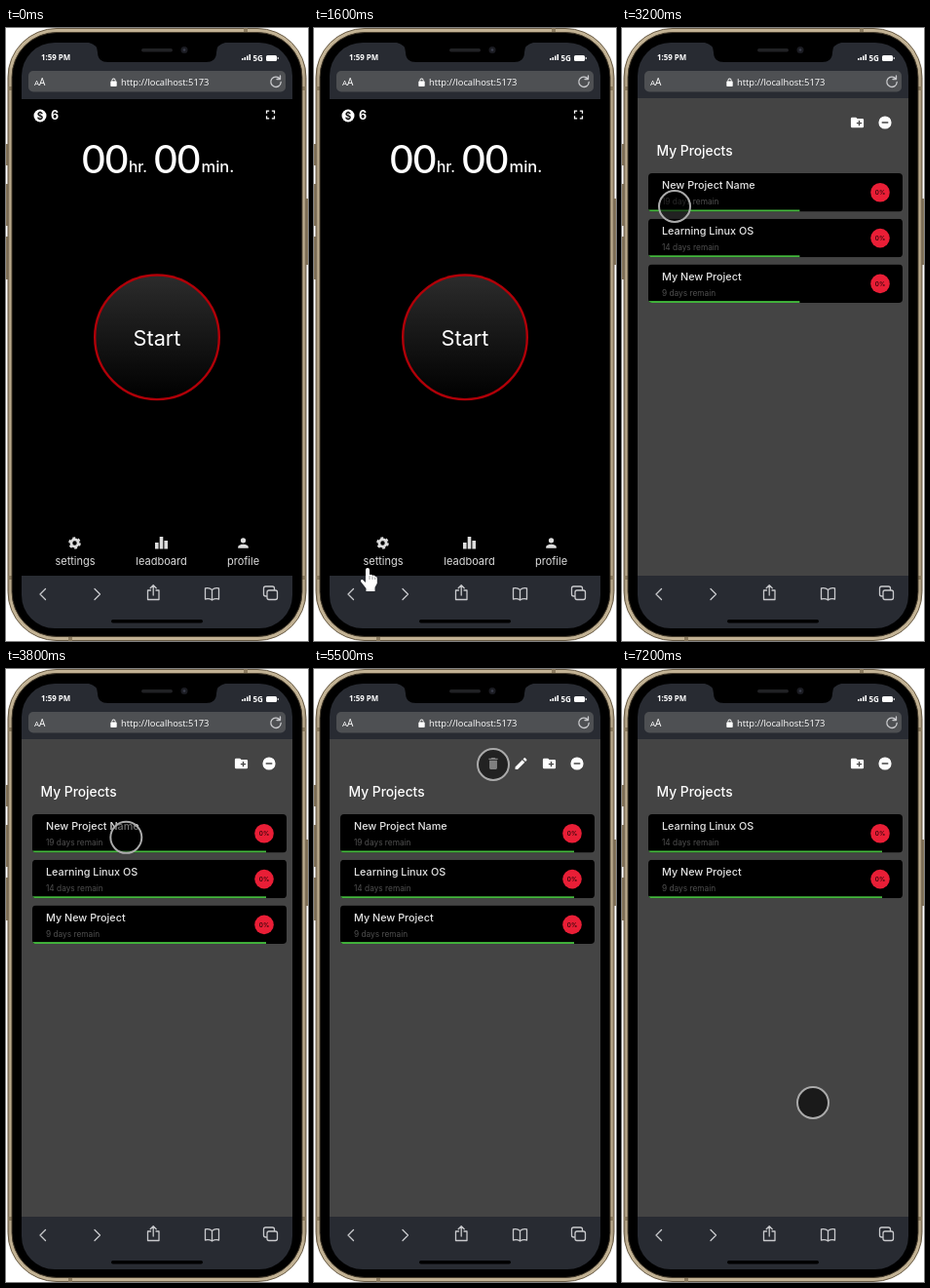
An HTML page that plays this animation: 310 px wide and 629 px high, repeating every 8 s.

```html
<!DOCTYPE html>
<html lang="en">
<head>
<meta charset="utf-8">
<title>Project timer</title>
<style>
  html, body { margin: 0; width: 100%; height: 100%; overflow: hidden; background: #fff; }
  svg { display: block; width: 310px; height: 629px; font-family: Inter, sans-serif; fill: #fff; }
  .system { font-family: "Open Sans", sans-serif; }
  .digits { font: 500 41px Lato, sans-serif; }
  .unit { font-weight: 500; }
  .line { fill: none; stroke: #c9cacd; stroke-width: 1.3; stroke-linecap: round; stroke-linejoin: round; }
  .tabs { fill: #ddd; font-size: 11px; text-anchor: middle; }
</style>
</head>
<body>
<svg viewBox="0 0 310 629">
  <defs>
    <linearGradient id="gold">
      <stop stop-color="#8f7f65"/><stop offset=".01" stop-color="#c2b294"/>
      <stop offset=".99" stop-color="#c2b294"/><stop offset="1" stop-color="#8f7f65"/>
    </linearGradient>
    <linearGradient id="dome" x2="0" y2="1">
      <stop stop-color="#2c2c2c"/><stop offset="1" stop-color="#000"/>
    </linearGradient>
    <clipPath id="glass"><rect x="16" y="15" width="278" height="601" rx="34"/></clipPath>
    <clipPath id="cardShape"><rect width="261" height="39.5" rx="4"/></clipPath>
  </defs>

  <!-- phone body -->
  <path fill="#8a7a5f" d="M0 119h4v22H0zM0 160h4v43H0zM0 214h4v44H0zM306 175h4v68h-4z"/>
  <rect x="2" y=".5" width="306" height="628" rx="50" fill="url(#gold)" stroke="#6a5d48"/>
  <path fill="#8c7c60" d="M2 60h5v4H2zM303 60h5v4h-5zM2 562h5v4H2zM303 562h5v4h-5zM244 0h4v5h-4zM64 624h4v5h-4z"/>
  <rect x="6" y="4.5" width="298" height="620" rx="46" fill="#000" stroke="#4a4030"/>

  <g clip-path="url(#glass)">
    <rect x="16" y="15" width="278" height="601" fill="#282b32"/>

    <g id="home">
      <rect x="16" y="73" width="278" height="489" fill="#000"/>
      <circle cx="35" cy="90" r="6.5"/>
      <text x="35" y="93.7" font-size="10" font-weight="600" text-anchor="middle" fill="#000">$</text>
      <text x="46" y="94" font-size="12.5" font-weight="700">6</text>
      <g data-icon="expand" data-at="271.5 89"></g>
      <text class="digits" x="78" y="148.5">00</text>
      <text class="unit" x="126" y="148" font-size="15.5">hr.</text>
      <text class="digits" x="152" y="148.5">00</text>
      <text class="unit" x="200.5" y="148" font-size="16.5">min.</text>
      <circle cx="155" cy="317.3" r="63.8" fill="url(#dome)" stroke="#b00008" stroke-width="2.4"/>
      <text x="155" y="325.7" font-size="21.7" text-anchor="middle">Start</text>
      <g fill="none" stroke="#ddd">
        <circle cx="70.5" cy="528.5" r="3.6" stroke-width="2.8"/>
        <circle cx="70.5" cy="528.5" r="5.3" stroke-width="2" stroke-dasharray="2.8 2.75"/>
      </g>
      <path fill="#ddd" d="M153 528h3.6v6.5h-3.6zM157.7 522h3.6v12.5h-3.6zM162.4 526h3.6v8.5h-3.6z"/>
      <g data-icon="person" data-at="243.5 528.5" fill="#ddd"></g>
      <g class="tabs">
        <text x="71" y="551">settings</text>
        <text x="159.5" y="551">leadboard</text>
        <text x="243.5" y="551">profile</text>
      </g>
    </g>

    <g id="projects">
      <rect x="16" y="72" width="278" height="490" fill="#444"/>
      <g id="tools">
        <g data-icon="trash" data-at="184 97"></g>
        <g data-icon="pencil" data-at="212.5 97"></g>
      </g>
      <g data-icon="folder" data-at="241.5 97"></g>
      <g data-icon="minus" data-at="270 97"></g>
      <text x="35.5" y="131" font-size="13.8" font-weight="500">My Projects</text>
      <g id="cards"></g>
    </g>

    <!-- browser chrome -->
    <path fill="#000" d="M85 15h140q-9 2-9 10 0 10-11 10H105q-11 0-11-10 0-8-9-10z"/>
    <rect x="139" y="21" width="32" height="3.5" rx="1.7" fill="#202124"/>
    <circle cx="183" cy="22.5" r="3.5" fill="#1b1c22"/>
    <circle cx="183" cy="22.5" r="1.3" fill="#3a3d4a"/>
    <g class="system">
      <text x="36" y="33" font-size="7.9" font-weight="700">1:59 PM</text>
      <path d="M242 31h1.5v2H242zM244.5 30h1.5v3h-1.5zM247 28.5h1.5V33H247zM249.5 27h1.5v6h-1.5z"/>
      <text x="253.5" y="33.5" font-size="8" font-weight="700">5G</text>
      <rect x="267" y="28" width="11" height="6" rx="1.5"/>
      <path d="M278.7 30h1v2h-1z"/>
      <rect x="23" y="44" width="264" height="21.5" rx="5" fill="#4e5053"/>
      <text x="29" y="59" font-size="8">A</text>
      <text x="34" y="59" font-size="10">A</text>
      <g data-icon="lock" data-at="110.5 56" data-scale=".4"></g>
      <text x="118" y="59" font-size="9.35">http://localhost:5173</text>
    </g>
    <g class="line">
      <path d="M281.2 52.2a5.2 5.2 0 1 0 1 3.300M278 52.500h3.500V49"/>
      <path d="M40.500 575.500l-5.500 5.500 5.500 5.500M91 575.500l5.500 5.500-5.500 5.500"/>
      <path d="M148.500 577H145.500v9.500h11.500V577h-3M151.200 582v-10M148.200 574.700l3-3 3 3"/>
      <path d="M211.500 576.500q-3-2.500-7-1.500v11q4-1 7 1 3-2 7-1v-11q-4-1-7 1.500zv10.500"/>
      <rect x="268" y="577" width="10.500" height="9.500" rx="2"/>
      <path d="M267.500 583h-1a2 2 0 0 1-2-2v-6a2 2 0 0 1 2-2h7a2 2 0 0 1 2 2v1.500"/>
    </g>
    <rect x="108" y="607" width="94" height="3.600" rx="1.800" fill="#000"/>
  </g>

  <g id="hand">
    <path d="M-2 2a2 2 0 0 1 4 0v5q2-1 3 .8 2-.8 2.800 1 2-.2 2 2v5L7.500 20v4h-9v-3L-7 14q-.5-2.500 1.800-2l3.200 3z"/>
    <path d="M2 8v4M5 8.500V12M7.700 9.500V12" fill="none" stroke="#777" stroke-width=".7"/>
  </g>
  <circle id="touch" r="16" stroke="#aaa" stroke-width="2"/>
</svg>

<script>
const LOOP = 8000, OPEN_LIST = 1900, SHOW_TOOLS = 4400, DELETE = 7200;
const CARD_STEP = 46.8;
const $ = id => document.getElementById(id);

const icons = {
  expand: 'M7 14H5v5h5v-2H7zM5 10h2V7h3V5H5zM17 17h-3v2h5v-5h-2zM14 5v2h3v3h2V5z',
  person: 'M12 12a4 4 0 1 0 0-8 4 4 0 0 0 0 8zm0 2c-2.7 0-8 1.3-8 4v2h16v-2c0-2.7-5.3-4-8-4z',
  trash: 'M6 19a2 2 0 0 0 2 2h8a2 2 0 0 0 2-2V7H6zM19 4h-3.5l-1-1h-5l-1 1H5v2h14z',
  pencil: 'M3 17.25V21h3.75L17.8 9.94l-3.75-3.75zM20.7 7a1 1 0 0 0 0-1.4l-2.3-2.3a1 1 0 0 0-1.4 0l-1.85 1.85 3.75 3.75z',
  folder: 'M20 6h-8l-2-2H4a2 2 0 0 0-2 2v12a2 2 0 0 0 2 2h16a2 2 0 0 0 2-2V8a2 2 0 0 0-2-2zm-1 8h-3v3h-2v-3h-3v-2h3V9h2v3h3z',
  minus: 'M12 2a10 10 0 1 0 0 20 10 10 0 0 0 0-20zm5 11H7v-2h10z',
  lock: 'M18 8h-1V6A5 5 0 0 0 7 6v2H6a2 2 0 0 0-2 2v10a2 2 0 0 0 2 2h12a2 2 0 0 0 2-2V10a2 2 0 0 0-2-2zM9 8V6a3 3 0 0 1 6 0v2z'
};
for (const slot of document.querySelectorAll('[data-icon]')) {
  const { icon, at, scale = .66 } = slot.dataset;
  slot.innerHTML = `<path transform="translate(${at}) scale(${scale}) translate(-12 -12)" d="${icons[icon]}"/>`;
}

const projects = [['New Project Name', 19], ['Learning Linux OS', 14], ['My New Project', 9]];
$('cards').innerHTML = projects.map(([name, days]) => `
  <g class="card"><g clip-path="url(#cardShape)">
    <rect width="261" height="39.5" fill="#000"/>
    <text x="14" y="16" font-size="10.8" font-weight="500" fill="#e4e4e4">${name}</text>
    <text x="14" y="32" font-size="8.3" fill="#505050">${days} days remain</text>
    <circle cx="238" cy="19.8" r="9.8" fill="#e91e36"/>
    <text x="238" y="22.1" font-size="6.3" font-weight="500" text-anchor="middle" fill="#2b0408">0%</text>
    <rect class="bar" y="37.5" height="2" fill="#43b83c"/>
  </g></g>`).join('');
const cards = [...document.querySelectorAll('.card')];
const bars = [...document.querySelectorAll('.bar')];

// Each stop is [time, x, y]; movement between stops eases in and out.
const handPath = [[900, -20, 640], [1600, 55, 554], [1750, 68, 537]];
const touchPath = [
  [2300, 68, 538], [3200, 54, 183], [4000, 136, 171], [4200, 136, 171], [4500, 139, 169],
  [5050, 139, 169], [5500, 184, 98], [6150, 184, 98], [6500, 196, 445]
];

function position(path, t) {
  const next = path.findIndex(stop => stop[0] > t);
  if (next < 1) return path.at(next).slice(1);
  const [t0, x0, y0] = path[next - 1], [t1, x1, y1] = path[next];
  const p = (t - t0) / (t1 - t0), e = p * p * (3 - 2 * p);
  return [x0 + (x1 - x0) * e, y0 + (y1 - y0) * e];
}

const show = (el, visible) => el.setAttribute('display', visible ? 'inline' : 'none');
const place = (el, [x, y]) => el.setAttribute('transform', `translate(${x} ${y})`);

function draw(t) {
  const deleted = t >= DELETE;
  show($('home'), t < OPEN_LIST);
  show($('projects'), t >= OPEN_LIST);
  show($('tools'), t >= SHOW_TOOLS && !deleted);

  const progress = Math.max(0, Math.min(240, 4 + (t - 2300) * .168));
  bars.forEach(bar => bar.setAttribute('width', progress));
  cards.forEach((card, i) => {
    show(card, i > 0 || !deleted);
    place(card, [27, 149 + (i - deleted) * CARD_STEP]);
  });

  show($('hand'), t >= 900 && t < 2380);
  show($('touch'), t >= 2380);
  place($('hand'), position(handPath, t));
  place($('touch'), position(touchPath, t));
  const pressed = deleted || (t >= 5800 && t < 6200);
  $('touch').setAttribute('fill', `rgba(0,0,0,${pressed ? .62 : .5})`);
}

function tick() {
  draw(performance.now() % LOOP);
  requestAnimationFrame(tick);
}
tick();
</script>
</body>
</html>
```
